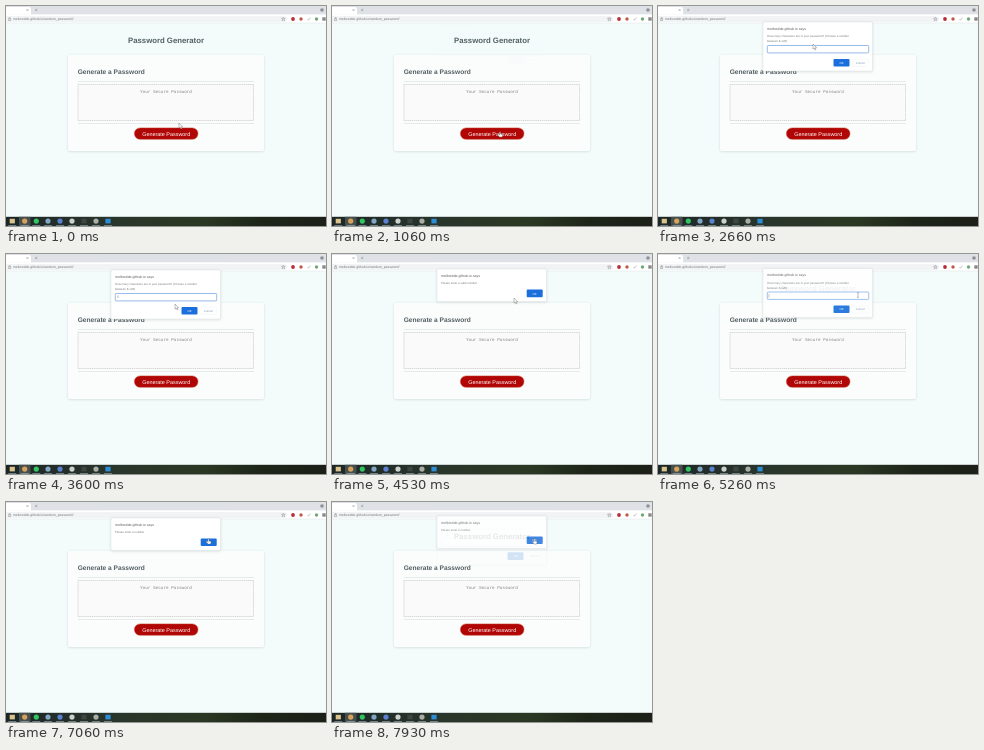
These frames come from a looping animation (320x220 px, 8000 ms). An HTML page:

```html
<!DOCTYPE html>
<html lang="en">
<head>
<meta charset="utf-8">
<title>Password Generator</title>
<style>
  html, body { margin: 0; width: 100%; height: 100%; overflow: hidden; background: #f3fbfb; }
  svg { display: block; width: 100vw; height: 100vh; }
  text { font-family: "Liberation Sans", Arial, sans-serif; fill: #74787c; text-rendering: geometricPrecision; }
  .bold { font-weight: 700; fill: #536062; }
  .mono { font-family: "Liberation Mono", monospace; fill: #858585; }
  .mid { text-anchor: middle; }
  .white { fill: #fff; }
  .line { fill: none; stroke: #8a8d90; stroke-width: .5; }
</style>
</head>
<body>
<svg viewBox="0 0 320 220" xmlns="http://www.w3.org/2000/svg">
  <defs>
    <filter id="soft" x="-10%" y="-10%" width="120%" height="130%">
      <feDropShadow dx="0" dy=".6" stdDeviation="1.2" flood-color="#455" flood-opacity=".2"/>
    </filter>
    <linearGradient id="bar">
      <stop offset="0" stop-color="#1d2726"/>
      <stop offset=".35" stop-color="#29362b"/>
      <stop offset=".62" stop-color="#2a3823"/>
      <stop offset=".8" stop-color="#1d2519"/>
      <stop offset="1" stop-color="#1c2018"/>
    </linearGradient>
  </defs>

  <rect width="320" height="220" fill="#f3fbfb"/>

  <g id="page">
    <text class="bold mid" x="160" y="36.8" font-size="7.77">Password Generator</text>
    <rect x="62" y="49" width="196" height="96" rx="2" fill="#fbfcfc" filter="url(#soft)"/>
    <text class="bold" x="71.7" y="67.7" font-size="6.6">Generate a Password</text>
    <path d="M72 75.5H248M72 117.5H248" stroke="#dfe2e2" stroke-width=".7"/>
    <rect x="72" y="78.5" width="175.5" height="36" fill="#fafafa" stroke="#c6c6c6" stroke-width=".7" stroke-dasharray="1.4 .7"/>
    <text class="mono mid" x="160" y="86.6" font-size="4.33">Your Secure Password</text>
    <rect x="128.4" y="121.9" width="63.6" height="11.4" rx="5.7" fill="#b00606" stroke="#c6452f" stroke-width=".5"/>
    <text class="mid white" x="160.2" y="129.5" font-size="5.43">Generate Password</text>
  </g>

  <g id="browser">
    <rect width="320" height="8.5" fill="#dee1e6"/>
    <path d="M0 8.5V1H23Q25 1 25 3V7Q25 8.5 26.5 8.5Z" fill="#fff"/>
    <path class="line" d="M20.5 3l2 2m0-2l-2 2M28.9 4h2.6M30.2 2.7v2.6"/>
    <circle cx="316" cy="4" r="1.8" fill="#8d9196"/>
    <rect y="8.5" width="320" height="8.5" fill="#fff"/>
    <rect x="-5" y="10" width="286" height="6" rx="3" fill="#f1f3f4"/>
    <path class="line" d="M2.6 12.6h2v2h-2zM3 12.5v-.8h1.2v.8"/>
    <text x="7" y="14.2" font-size="3.45">mellowtide.github.io/random_password/</text>
    <path class="line" d="M277.3 11.2l.5 1.3h1.4l-1.1.9.4 1.4-1.2-.8-1.2.8.4-1.4-1.1-.9h1.4z"/>
    <circle cx="287" cy="13" r="1.9" fill="#b72e3b"/>
    <circle cx="295" cy="13" r="1.7" fill="#bd5945"/>
    <path class="line" d="M301.5 13l1 1.2 2-2.7" stroke-width=".8"/>
    <circle cx="310.5" cy="13" r="1.7" fill="#70a878"/>
    <rect x="316.3" y="11.3" width="3.4" height="3.4" fill="#858a8e"/>
    <path d="M0 17H320" stroke="#dce2e3" stroke-width=".5"/>
  </g>

  <g id="taskbar"><rect y="210.8" width="320" height="9.2" fill="url(#bar)"/></g>
  <g id="dialogs"></g>

  <g id="cursor">
    <g transform="scale(.85)" stroke="#666" stroke-width=".5" fill="#fff">
      <path id="arrow" d="M0 0V6L1.4 4.8 2.4 7 3.4 6.5 2.4 4.5H4.3Z"/>
      <path id="hand" d="M-.6 0Q0-.7.6 0V2.3L2.7 2.8Q3.2 3 3 4L2.4 6H-.6L-2.4 3.6Q-2-.1-.6 3.7Z"/>
      <path id="beam" d="M-1-2.8H1M0-2.8V2.8M-1 2.8H1" fill="none"/>
    </g>
  </g>
</svg>

<script>
const LOOP = 8000;
const $ = id => document.getElementById(id);
const clamp = v => Math.max(0, Math.min(1, v));

// Taskbar: x, colour, shape
const icons = [
  [6.3, '#d8c48c', 'square'], [18.7, '#d8a25a', 'circle'], [30.3, '#30c463', 'circle'],
  [42, '#7fa6c4', 'circle'], [54, '#5a80cf', 'circle'], [66, '#c9d2ce', 'circle'],
  [78, '#3c4643', 'square'], [90, '#a9ada6', 'circle'], [102, '#2b8dd6', 'square']
];
$('taskbar').innerHTML += '<rect x="13" y="210.8" width="11.5" height="9.2" fill="#46504f"/>' +
  icons.map(([x, fill, shape]) => (shape === 'circle'
    ? `<circle cx="${x}" cy="215.1" r="2.6" fill="${fill}"/>`
    : `<rect x="${x - 2.6}" y="212.8" width="5.2" height="4.6" fill="${fill}"/>`) +
    `<path d="M${x - 4} 219.5h8" stroke="#9fb9c8" stroke-width=".6"/>`).join('');

const okButton = (x, y) => `
  <rect x="${x}" y="${y}" width="16" height="7.6" rx="1" fill="#1a6fdc"/>
  <text class="mid white" x="${x + 8}" y="${y + 4.9}" font-size="2.9">OK</text>`;

const dialog = (id, height, body) => `<g id="${id}">
  <rect x="105" y="16" width="109.5" height="${height}" rx="1" fill="#fff" stroke="#d3d8d8" stroke-width=".4" filter="url(#soft)"/>
  <text x="109" y="23.8" font-size="3.5" style="fill:#55585c">mellowtide.github.io says</text>
  ${body}</g>`;

const message = (y, words) => `<text x="109" y="${y}" font-size="2.9">${words}</text>`;

$('dialogs').innerHTML =
  dialog('prompt', 49,
    message(31.2, 'How many characters are in your password? (Choose a number') +
    message(36.4, 'between 8-128)') + `
    <rect x="109.3" y="39.5" width="101.4" height="7.4" rx=".8" fill="#fff" stroke="#6f9fe4" stroke-width=".7"/>
    <text id="value" x="111" y="44.4" font-size="3.3">5</text>
    <path id="caret" d="M111 41.3v3.8" stroke="#666" stroke-width=".4"/>` +
    okButton(175.5, 53) + `
    <rect x="194" y="53.2" width="16.6" height="7.2" rx="1" fill="#fff" stroke="#eceff2" stroke-width=".4"/>
    <text class="mid" x="202.3" y="57.9" font-size="2.9" style="fill:#7f97bd">Cancel</text>`) +
  dialog('invalid', 32.5, message(31.2, 'Please enter a valid number') + okButton(194.7, 36.5)) +
  dialog('missing', 32.5, message(31.2, 'Please enter a number') + okButton(194.7, 36.5));

// Open and close times
const visits = {
  prompt: [[1060, 4220], [5040, 6150], [7890, Infinity]],
  invalid: [[4220, 5020]],
  missing: [[6130, 7890]]
};

const path = [
  [0, 173, 117], [200, 173, 117], [700, 168, 126], [1100, 168, 126],
  [1550, 155, 38], [3420, 155, 38], [3600, 169, 50], [3850, 183, 56],
  [4250, 183, 56], [4530, 182, 44], [4800, 201, 40], [5120, 201, 40],
  [5260, 200, 41], [5550, 200, 41], [6000, 181.5, 57.5], [6400, 181.5, 57.5],
  [6900, 202.5, 37], [LOOP, 202.5, 37]
];

const shapes = [
  [0, 'arrow'], [550, 'hand'], [1150, 'arrow'], [3780, 'hand'], [4330, 'arrow'],
  [4700, 'hand'], [5090, 'beam'], [5650, 'arrow'], [5880, 'hand'], [6480, 'arrow'], [6780, 'hand']
];

const latest = (table, t) => table.filter(row => row[0] <= t).pop();

function drawDialog(id, t) {
  const [open, close] = latest(visits[id], t) || [LOOP, LOOP];
  const leaving = clamp((t - close) / 240);
  const rise = 1 - clamp((t - open) / 440) + 1 - (1 - leaving) ** 6;
  $(id).setAttribute('opacity', clamp((t - open) / 240) * (1 - leaving));
  $(id).setAttribute('transform', `translate(0 ${-3 * rise})`);
}

function drawCursor(t) {
  const next = path.findIndex(point => point[0] > t);
  const [t0, x0, y0] = path[next - 1];
  const [t1, x1, y1] = path[next];
  const k = (t - t0) / (t1 - t0);
  const e = k * k * (3 - 2 * k);
  $('cursor').setAttribute('transform', `translate(${x0 + (x1 - x0) * e} ${y0 + (y1 - y0) * e})`);
  const shape = latest(shapes, t)[1];
  for (const id of ['arrow', 'hand', 'beam']) $(id).setAttribute('opacity', +(id === shape));
}

function draw(t) {
  Object.keys(visits).forEach(id => drawDialog(id, t));
  const typed = t >= 3200 && t < 4600;
  const opened = latest(visits.prompt, t)?.[0] ?? 0;
  $('value').setAttribute('opacity', +typed);
  $('caret').setAttribute('opacity', +(!typed && (t - opened) % 1000 < 500));
  drawCursor(t);
}

const start = performance.now();
function frame() {
  draw((performance.now() - start) % LOOP);
  requestAnimationFrame(frame);
}
frame();
</script>
</body>
</html>
```
